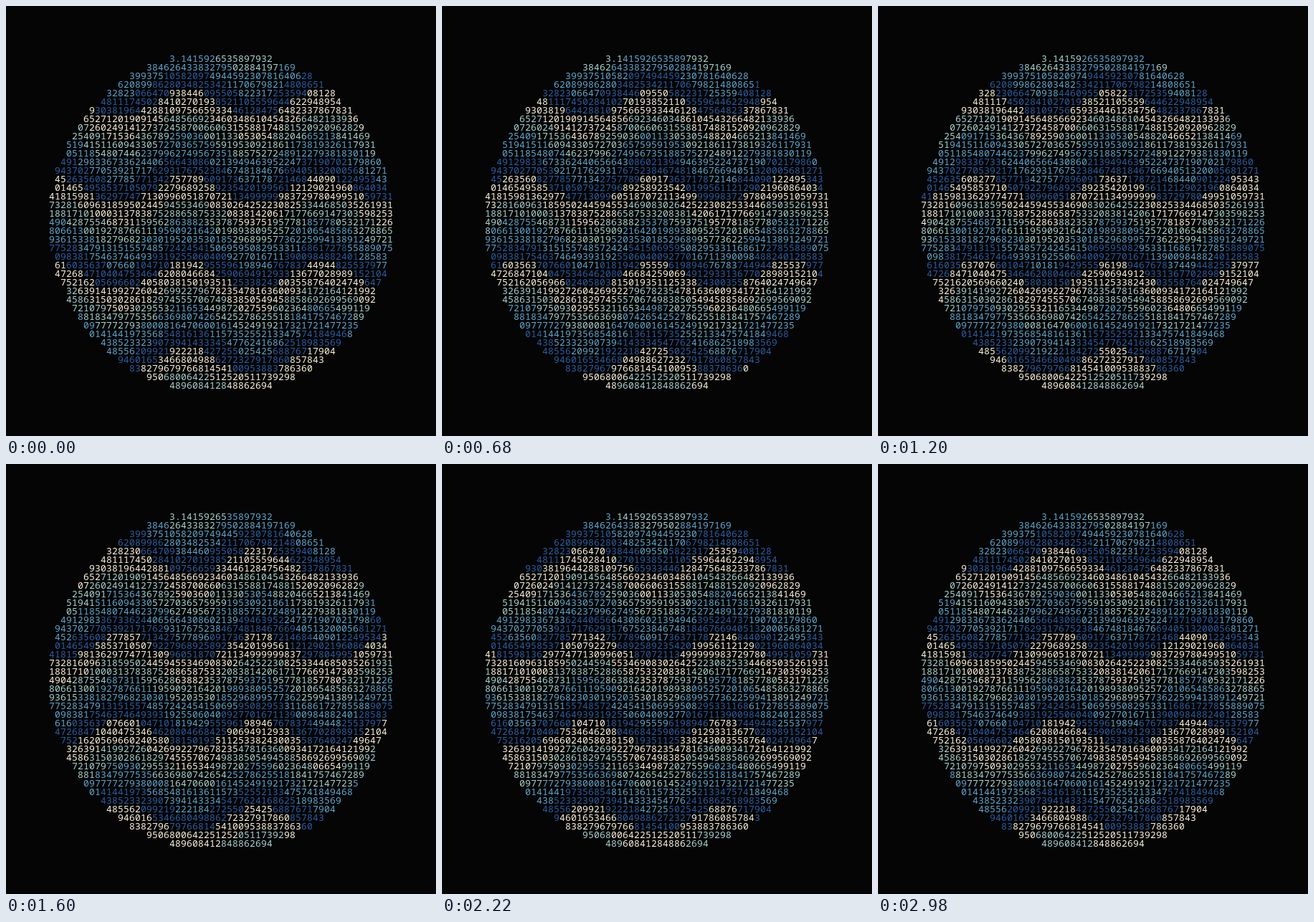
Recreate the animation shown at these times as an HTML page with a canvas. Size 600x600 px, loop 3000 ms.

```html
<!DOCTYPE html>
<html lang="en">
<head>
<meta charset="utf-8">
<title>Digits of pi</title>
<style>
html, body { margin: 0; width: 100%; height: 100%; overflow: hidden; background: #050505; }
canvas { display: block; width: 600px; height: 600px; }
</style>
</head>
<body>
<canvas id="stage" width="600" height="600"></canvas>
<script>
const ctx = document.getElementById('stage').getContext('2d');
const LOOP = 3000, STEP = 20;
const CELL_W = 8, CELL_H = 12, ROWS = 39, MID = 19, RADIUS = 240;
const BASELINE = 78;
const PALETTE = ['#a8d5d1', '#5fa8d0', '#2a5ea4', '#fff6dc'];

// Machin's formula in fixed point
function piDigits(count) {
  const one = 10n ** BigInt(count + 10);
  const arccot = n => {
    let term = one / n, sum = term, sign = -1n;
    for (let d = 3n; term > 0n; d += 2n, sign = -sign) {
      term /= n * n;
      sum += sign * (term / d);
    }
    return sum;
  };
  const pi = String(4n * (4n * arccot(5n) - arccot(239n)));
  return pi[0] + '.' + pi.slice(1, count);
}

function layout() {
  const text = piDigits(2000);
  const cells = [];
  for (let row = 0; row < ROWS; row++) {
    const dy = (row - MID) * CELL_H;
    for (let col = -30; col < 30; col++) {
      const dx = (col + 0.5) * CELL_W;
      if (Math.hypot(dx, dy) > RADIUS) continue;
      cells.push({ char: text[cells.length], row, dx });
    }
  }
  return cells;
}

const cells = layout();

function draw(ms) {
  const phase = ms / LOOP * Math.PI * 2;
  ctx.fillStyle = '#050505';
  ctx.fillRect(0, 0, 600, 600);
  ctx.font = '13px "Noto Sans Mono", "DejaVu Sans Mono", monospace';
  ctx.textAlign = 'center';
  ctx.textBaseline = 'alphabetic';
  for (const { char, row, dx } of cells) {
    const wave = Math.sin(phase - 8 * dx / RADIUS);
    const band = Math.floor(0.4 * (row - MID) + 0.5 + 0.66 * wave);
    ctx.fillStyle = PALETTE[(band + 40) % 4];
    ctx.fillText(char, 300 + dx, BASELINE + row * CELL_H);
  }
}

function frame(now) {
  draw(Math.floor(now % LOOP / STEP) * STEP);
  requestAnimationFrame(frame);
}
draw(0);
requestAnimationFrame(frame);
</script>
</body>
</html>
```
